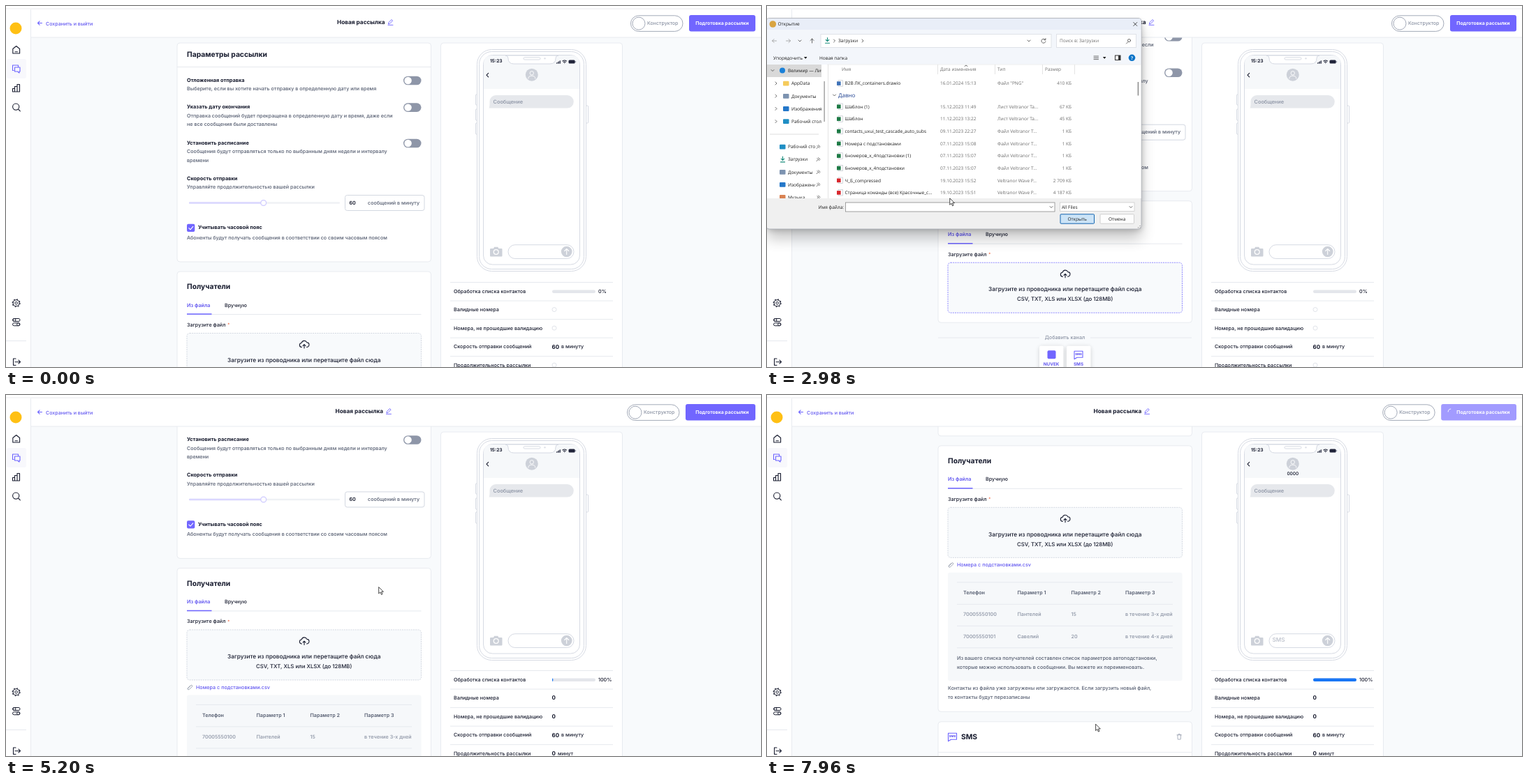
Animation, 1081 px wide and 518 px high, one loop 8000 ms. Source, as an HTML page:

```html
<!DOCTYPE html>
<html lang="ru">
<head>
<meta charset="utf-8">
<title>Новая рассылка</title>
<style>
html, body { margin: 0; width: 100%; height: 100%; overflow: hidden; background: #f8fafc; }
svg { display: block; width: 100%; height: 100%; }
text { font-family: Inter, sans-serif; font-size: 7.2px; font-weight: 500; fill: #171b2e; text-rendering: geometricPrecision; white-space: pre; }
.d { font-size: 7.17px; font-weight: 450; fill: #555d70; }
.b { font-size: 7.35px; font-weight: 700; }
.h { font-size: 10.3px; font-weight: 700; }
.z { font-size: 8.3px; }
.p { fill: #6257f0; }
.g { fill: #8a92a3; }
.n { font-weight: 700; font-size: 8px; }
.w { font-family: "Open Sans", "Noto Sans", sans-serif; font-size: 6.5px; font-weight: 400; fill: #1c1c1c; }
.k { fill: #6d6d6d; }
.i { fill: none; stroke: #171b2e; stroke-width: 1.1; stroke-linecap: round; stroke-linejoin: round; }
.v { stroke: #6c63ff; }
.l { fill: none; stroke: #d6dae3; stroke-width: 1; }
</style>
</head>
<body>
<svg id="stage" viewBox="0 0 1081 518" preserveAspectRatio="none"></svg>
<script>
const LOOP = 8000;
const VIOLET = '#7166ff';

// Text is placed by the middle of its capital height.
const text = (x, y, s, cls = '', more = '') => `<text x="${x}" y="${y}" dy=".36em" class="${cls}" ${more}>${s}</text>`;
const rect = (x, y, w, h, fill, more = '') => `<rect x="${x}" y="${y}" width="${w}" height="${h}" fill="${fill}" ${more}/>`;
const dot = (x, y, r, fill, more = '') => `<circle cx="${x}" cy="${y}" r="${r}" fill="${fill}" ${more}/>`;
const path = (d, cls = 'i', more = '') => `<path d="${d}" class="${cls}" ${more}/>`;
const hline = (x, y, x2, c = '#e6e9ee') => `<path d="M${x} ${y}H${x2}" stroke="${c}"/>`;
const group = (id, body, more = '') => `<g id="${id}" ${more}>${body}</g>`;
const shadow = (x, y, w, h, blur, alpha) => rect(x, y, w, h, '#000', `rx="4" opacity="${alpha}" style="filter:blur(${blur}px)"`);
const card = (y, h, id = '') => rect(245, y, 363.5, h, '#fff', `rx="4" stroke="#e8ebf0" ${id && `id="${id}"`}`);
const lines = (x, y, gap, cls, rows) => rows.map((s, i) => text(x, y + i * gap, s, cls)).join('');

const toggle = y => rect(569, y - 6.3, 25.5, 12.6, '#8e96a8', 'rx="6.3"') + dot(575.6, y, 5.2, '#fff');
const option = (y, name, rows) => text(259, y, name, 'b') + lines(259, y + 12.5, 12.6, 'd', rows);

const smsIcon = (x, y) => path(`M${x - 6} ${y - 5}h12v9h-8l-4 2.5z`, 'i v') +
  text(x, y - .5, 'SMS', 'p', 'text-anchor="middle" style="font-size:4.2px;font-weight:800"');

const settings = () => card(53, 314) +
  text(259, 69.5, 'Параметры рассылки', 'h') + hline(245, 87.5, 608) +
  option(106, 'Отложенная отправка', ['Выберите, если вы хотите начать отправку в определенную дату или время']) +
  option(144.5, 'Указать дату окончания', ['Отправка сообщений будет прекращена в определенную дату и время, даже если', 'не все сообщения были доставлены']) +
  option(196, 'Установить расписание', ['Сообщения будут отправляться только по выбранным дням недели и интервалу', 'времени']) +
  option(247, 'Скорость отправки', ['Управляйте продолжительностью вашей рассылки']) +
  [107, 145.6, 197].map(toggle).join('') +
  rect(262, 281.3, 216, 2.4, '#eff1f5', 'rx="1"') + rect(262, 281.3, 107, 2.4, '#dad7ff', 'rx="1"') +
  dot(368.7, 282.5, 3.9, '#fff', 'stroke="#cfcbff" stroke-width="1.3"') +
  rect(485.5, 271.5, 113.5, 22, '#fff', 'rx="3" stroke="#d3d8e1"') +
  text(491.5, 282, '60', '', 'style="font-weight:600"') + text(518, 282, 'сообщений в минуту', 'd') +
  rect(259, 312.8, 11.3, 11.3, VIOLET, 'rx="2"') + path('M261.8 318.6l2.2 2.2l3.8-4.4', 'i', 'style="stroke:#fff"') +
  text(275, 317.5, 'Учитывать часовой пояс', 'b') +
  text(259, 332.3, 'Абоненты будут получать сообщения в соответствии со своим часовым поясом', 'd');

const COLS = [281, 358.5, 435.5, 513];
const tableRow = (y, cells, cls, more) => cells.map((s, i) => text(COLS[i], y, s, cls, more)).join('');
const table = () => rect(259, 563, 335.5, 155.5, '#f6f8fa', 'rx="3"') +
  [577, 608.5, 639.5, 671].map(y => hline(272, y, 581)).join('') +
  tableRow(592, ['Телефон', 'Параметр 1', 'Параметр 2', 'Параметр 3'], 'd', 'style="font-weight:600"') +
  tableRow(623, ['70005550100', 'Пантелей', '15', 'в течение 3-х дней'], 'g') +
  tableRow(654.5, ['70005550101', 'Савелий', '20', 'в течение 4-х дней'], 'g') +
  lines(272, 686, 12.4, 'd', ['Из вашего списка получателей составлен список параметров автоподстановки,', 'которые можно использовать в сообщении. Вы можете их переименовать.']);

const tile = x => shadow(x, 590, 34.5, 36, 3, .16) + rect(x, 589, 34.5, 35, '#fff', 'rx="2"');
const recipients = () => card(381, 174.5, 'box') +
  text(259, 402.5, 'Получатели', 'h') +
  text(259, 429, 'Из файла', 'p', 'style="font-weight:600"') + text(313, 429, 'Вручную') +
  hline(259, 442.5, 594.5) + rect(259, 441.3, 35.5, 1.5, '#6c63ff') +
  text(259, 457.3, 'Загрузите файл') + text(317.3, 457, '*', '', 'style="fill:#f0643c;font-size:6px"') +
  rect(259, 469.5, 335.5, 72, '#f8fafc', 'id="zone" rx="4" stroke-dasharray="2 1.2"') +
  path('M423.5 489.5a3 3 0 0 1-.3-6a4 4 0 0 1 7.6-.6a3.2 3.2 0 0 1-.3 6.6M427 491v-5.4m-2 2l2-2l2 2') +
  text(426.7, 507.8, 'Загрузите из проводника или перетащите файл сюда', 'z', 'text-anchor="middle"') +
  text(426.7, 522, 'CSV, TXT, XLS или XLSX (до 128MB)', 'z', 'text-anchor="middle" style="font-size:7.8px"') +
  group('link', path('M260.5 553.5l4.2-4.2q1.4-1 2 .3q.4.8-.5 1.6l-3.8 3.8q-1.6 1.1-2.3-.4q-.3-1 .6-1.8l3.2-3.2', 'i', 'style="stroke:#8a92a3;stroke-width:.8"') + text(272, 551.5, 'Номера с подстановками.csv', 'p')) +
  group('table', table()) +
  group('note', lines(259, 729, 12.4, 'd', ['Контакты из файла уже загружены или загружаются. Если загрузить новый файл,', 'то контакты будут перезаписаны'])) +
  group('add', hline(245, 577.3, 390) + hline(463, 577.3, 608) +
    text(426.5, 576.8, 'Добавить канал', 'g', 'text-anchor="middle"') +
    tile(390) + tile(429) + rect(401.5, 595.5, 12, 12, VIOLET, 'rx="2"') + smsIcon(446, 601.5) +
    text(407, 615.3, 'NUVEK', 'p', 'text-anchor="middle" style="font-size:6.3px;font-weight:700"') +
    text(446, 615.3, 'SMS', 'p', 'text-anchor="middle" style="font-size:6.3px;font-weight:700"')) +
  group('sms', card(777, 120) + smsIcon(265.5, 798.5) + text(278, 798, 'SMS', 'h') + hline(245, 821, 608) +
    path('M587 796h6.4M589 796v-1.2h2.4v1.2M587.8 796l.4 6.3h4l.4-6.3', 'i', 'style="stroke:#a3aab8;stroke-width:.9"'));

const frame = (x, y, w, h, r, fill = '#fff') => rect(x, y, w, h, fill, `rx="${r}" stroke="#d6dae3"`);
const phone = () => [[672, 127, 15], [672, 148, 16], [672, 168, 16], [830, 143, 25]].map(([x, y, h]) => frame(x + .5, y, 3, h, 1)).join('') +
  frame(674.5, 62.5, 156, 318, 21) + frame(677.5, 65.5, 150, 312, 18) + frame(683.5, 70.5, 138, 300.5, 13) +
  rect(684, 84, 137, 35, '#f6f8fa') + path('M684 84V83q0-12 12-12H809q12 0 12 12V84z', '', 'fill="#f6f8fa"') +
  path('M715 71q4 0 4 4q0 8 8 8h52q8 0 8-8q0-4 4-4z', '', 'fill="#fff" stroke="#d6dae3"') +
  frame(741, 73.8, 24, 3.2, 1.6) + dot(771.5, 75.3, 1.3, '#e1e4ea') +
  text(693, 79, '15:23', '', 'style="font-size:6.6px;font-weight:700"') +
  [0, 1, 2, 3].map(i => rect(788 + i * 1.6, 81.3 - i, 1.1, 1.4 + i, '#20243a')).join('') +
  path('M797 79q2.7-2 5.4 0M798.3 80.6q1.4-1 2.8 0M799.7 82h.1') + rect(805.5, 77.6, 9.2, 5, '#20243a', 'rx="1.5"') + rect(815.2, 79.2, 1, 1.8, '#8a92a3') +
  path('M690.7 96.4l-2.7 2.7l2.7 2.7') +
  dot(752.8, 98.7, 9, '#cdd1d9') + dot(752.8, 96.3, 2.7, 'none', 'stroke="#fff" stroke-width=".9"') + path('M747.8 104q0-3.8 5-3.8t5 3.8', 'i', 'style="stroke:#fff;stroke-width:.9"') +
  path('M701.5 128h102a9.3 9.3 0 0 1 0 18.6h-112q1.2-2 1-9.3a9 9 0 0 1 9-9.3z', '', 'fill="#e6e8ec"') +
  text(697.5, 137, 'Сообщение', 'g', 'style="font-size:7.4px"') +
  path('M694 348h3.8l1.4-2.2h5l1.4 2.2h3.9q1 0 1 1v9.5q0 1-1 1h-15.5q-1 0-1-1v-9.5q0-1 1-1z', '', 'fill="#cdd1d9"') + dot(701.7, 353, 3.4, 'none', 'stroke="#fff" stroke-width="1.3"') +
  frame(719, 342.7, 94, 19.8, 9.9) + dot(802.7, 352.5, 7.8, '#cdd1d9') + path('M802.7 356.5v-8m-3 3l3-3l3 3', 'i', 'style="stroke:#fff"') +
  group('sender', text(752.8, 112.6, '0000', '', 'text-anchor="middle" style="font-size:6.5px"') + text(723.5, 351.5, 'SMS', '', 'style="font-size:8.2px;fill:#b9bec9"'));

const NAMES = ['Обработка списка контактов', 'Валидные номера', 'Номера, не прошедшие валидацию', 'Скорость отправки сообщений', 'Продолжительность рассылки'];
const rowY = i => 409 + i * 26.55;
const stats = () => NAMES.map((s, i) => hline(636, rowY(i) - 12.5, 869) + text(641, rowY(i), s)).join('') +
  rect(782, 407.6, 62, 4.4, '#e4e6eb', 'rx="2.2"') + rect(782, 407.6, 0, 4.4, '#1976f5', 'id="bar" rx="2.2"') +
  text(781.5, rowY(3), '60', 'n') + text(795, rowY(3), 'в минуту') +
  group('wait', text(848, 409, '0%') + [1, 2, 4].map(i => dot(785, rowY(i), 3, 'none', 'stroke="#e1e4ea"')).join('')) +
  group('done', text(848, 409, '100%') + [1, 2, 4].map(i => text(781.5, rowY(i), '0', 'n')).join('') + text(790, rowY(4), 'минут'));

const header = () => rect(0, 0, 1081, 45, '#fff') + hline(0, 4, 1081, '#e8e9ec') + hline(35, 45, 1081, '#e8ebf0') +
  path('M51.5 24.5h-6m2.6-2.6l-2.6 2.6l2.6 2.6', 'i v') + text(57, 25, 'Сохранить и выйти', 'p', 'style="font-size:7.1px"') +
  group('name', text(474, 23.2, 'Новая рассылка', '', 'style="font-size:8.28px;font-weight:650"') +
    path('M547.5 25.5l.5-2l4-4l1.6 1.6l-4 4zM547 27.3h7', 'i v', 'style="stroke-width:.9"')) +
  group('mode', rect(894.5, 13.8, 74.5, 22.6, '#fff', 'rx="11.3" stroke="#a3aab8"') + dot(906, 25.1, 9, '#fff', 'stroke="#a3aab8"') +
    text(918, 24.4, 'Конструктор', 'g', 'style="font-size:7.03px"')) +
  rect(978, 13, 95, 23.5, VIOLET, 'id="btn" rx="3"') +
  text(987.3, 24.4, 'Подготовка рассылки', '', 'style="fill:#fff;font-size:6.85px;font-weight:650"') +
  group('spin', path('M2.7-2.7A3.8 3.8 0 0 1 2.7 2.7', 'i', 'style="stroke:#fff;stroke-width:.9"'));

const sidebar = () => rect(0, 4.5, 35, 514, '#fff') + path('M35.5 5V518', 'l', 'style="stroke:#e8ebf0"') +
  dot(14, 32, 8.5, '#ffc014') + rect(1, 76, 28, 28, '#f8f8fc', 'rx="3"') +
  path('M9.8 61.5l4.9-4l4.9 4v6.5h-9.8zM13 65.7h3.4') +
  path('M11 92.5h-1.5v-7.5h8v2.5M12.5 88h7.5v6h-1v2l-2.5-2h-4z', 'i v') +
  path('M9.5 118.5h3v4.5h-3zM12.5 115.5h3.5v7.5h-3.5zM16 112.5h3.5v10.5h-3.5z') +
  path('M18 148.5l2.3 2.3') + dot(14.2, 144.6, 4.6, 'none', 'stroke="#171b2e" stroke-width="1.1"') +
  dot(14.6, 426.3, 4.5, 'none', 'stroke="#171b2e" stroke-width="1.1"') + dot(14.6, 426.3, 1.8, 'none', 'stroke="#171b2e"') +
  dot(14.6, 426.3, 5.5, 'none', 'stroke="#171b2e" stroke-width="1.1" stroke-dasharray="1.8 2.52"') +
  [450.5, 456.8].map((y, i) => rect(9.5, y - 2, 10.5, 4, 'none', 'rx="2" stroke="#171b2e"') + dot(i ? 17.5 : 12, y, 1.9, '#fff', 'stroke="#171b2e"')).join('') +
  hline(0, 480.5, 29) + path('M14 506h-3.5v9.5h3.5M13 510.7h7.5m-2.5-2.5l2.5 2.5l-2.5 2.5');

const thin = (d, c = '#444') => path(d, 'i', `style="stroke:${c};stroke-width:.8"`);
const chevron = (x, y, down) => thin(down ? `M${x - 2} ${y - 1}l2 2l2-2` : `M${x - 1} ${y - 2}l2 2l-2 2`);
const BLUE = '#3f72b8', GREEN = '#1d7a45', RED = '#d8262c';
const FILES = [
  [111, BLUE, 'B2B ЛК_containers.drawio', '16.01.2024 15:13', 'Файл "PNG"', '410 КБ'],
  [144.2, GREEN, 'Шаблон (1)', '15.12.2023 11:49', 'Лист Veltranor Ta...', '67 КБ'],
  [162, GREEN, 'Шаблон', '11.12.2023 13:22', 'Лист Veltranor Ta...', '45 КБ'],
  [179.6, GREEN, 'contacts_uxui_test_cascade_auto_subs', '09.11.2023 22:27', 'Файл Veltranor T...', '1 КБ'],
  [197.3, GREEN, 'Номера с подстановками', '07.11.2023 15:08', 'Файл Veltranor T...', '1 КБ'],
  [215, GREEN, '6номеров_х_4подстановки (1)', '07.11.2023 15:07', 'Файл Veltranor T...', '1 КБ'],
  [232.5, GREEN, '6номеров_х_4подстановки', '07.11.2023 15:07', 'Файл Veltranor T...', '1 КБ'],
  [250.2, RED, 'Ч_Б_compressed', '19.10.2023 15:52', 'Veltranor Wave P...', '2 709 КБ'],
  [267.8, RED, 'Страница команды (все) Красочные_с...', '19.10.2023 15:51', 'Veltranor Wave P...', '4 187 КБ']];
const fileRow = ([y, c, name, date, kind, size]) => rect(102, y - 4.2, 6.6, 8.4, '#fff', 'stroke="#b4bac2" stroke-width=".6"') +
  rect(100, y - 2.7, 5.6, 5.6, c) + text(111.5, y, name, 'w') +
  text(248, y, date, 'w k') + text(330, y, kind, 'w k') + text(436, y, size, 'w k', 'text-anchor="end"');
const place = (x, y, c, name) => rect(x, y - 3.3, 8.5, 6.8, c, 'rx="1"') + text(x + 12, y, name, 'w');
const downMark = (x, y) => path(`M${x} ${y - 4}v5m-2.2-2l2.2 2.2l2.2-2.2M${x - 3} ${y + 3.8}h6`, 'i', 'style="stroke:#168a7a"');

const navigation = () => rect(0, 84, 78, 18, '#d9d9d9') + chevron(8, 92.5, 1) + dot(22, 92.5, 4, '#1a80d8') + text(30, 92.5, 'Велимир — Личное', 'w') +
  [['AppData', '#f5cb5c'], ['Документы', '#7d93b0'], ['Изображения', '#2477c9'], ['Рабочий стол', '#1f8ec4']].map(([s, c], i) =>
    chevron(13, 111 + i * 18.2) + place(23, 111 + i * 18.2, c, s)).join('') +
  hline(4, 184, 74, '#ddd') +
  [['Рабочий сто', '#1f8ec4'], ['Загрузки'], ['Документы', '#7d93b0'], ['Изображени', '#2477c9'], ['Музыка', '#d98252']].map(([s, c], i) => {
    const y = 202 + i * 18.1;
    return (c ? place(18, y, c, s) : downMark(22.5, y) + text(30, y, s, 'w')) + rect(69, y - 3, 9, 7, '#fff') + thin(`M71 ${y + 2.5}l2-2m-1-2l3 3m-1.5-4l2.5 2.5`);
  }).join('');

const dialog = () => shadow(0, 34, 536, 300, 10, .22) + shadow(0, 22, 536, 299, 4, .22) +
  rect(-1, 17.5, 537, 302.5, '#f0f0f0', 'rx="4" stroke="#a9adb5" stroke-width=".8"') +
  rect(0, 18, 535.5, 18, '#e9eef8', 'rx="3"') + rect(0, 34, 535.5, 50, '#f3f6fb') + rect(0, 84, 535.5, 192, '#fff') +
  dot(8.3, 26, 4.8, '#d9a441') + text(15.5, 26, 'Открытие', 'w') + thin('M524.8 23.5l5 5m0-5l-5 5', '#222') +
  thin('M13.5 50h-6m2.5-2.5l-2.5 2.5l2.5 2.5M27.5 50h6m-2.5-2.5l2.5 2.5l-2.5 2.5', '#999') +
  thin('M64.5 53v-6m-2.5 2.5l2.5-2.5l2.5 2.5') + chevron(47, 50, 1) +
  rect(77, 40.5, 330, 19, '#fff', 'stroke="#dfe2e8"') + rect(414.5, 40.5, 114, 19, '#fff', 'stroke="#dfe2e8"') +
  downMark(86.5, 49.5) + chevron(96.5, 50) + text(102, 50, 'Загрузки', 'w') + chevron(137, 50) + chevron(375, 50, 1) +
  thin('M398.5 48.5a3 3 0 1 0 .4 2.5M398.9 46.5v2.2h-2.2') + text(419, 50, 'Поиск в: Загрузки', 'w k') +
  thin('M517 51.5l-2.5 2.5M520.5 49.5a2 2 0 1 1-4 0a2 2 0 1 1 4 0') +
  text(9, 74.3, 'Упорядочить', 'w') + text(75, 74.3, 'Новая папка', 'w') + path('M53 73l2.2 2.7l2.2-2.7zM481 73l2.2 2.7l2.2-2.7z', '') +
  thin('M468 72h6.5m-6.5 2.3h6.5m-6.5 2.3h6.5') + rect(498.5, 71, 7.5, 6.5, '#fff', 'stroke="#333"') + rect(503, 71, 3, 6.5, '#333') +
  dot(522.5, 74.3, 4.8, '#0b74c8') + text(522.5, 74.3, '?', 'w', 'text-anchor="middle" style="fill:#fff;font-weight:700"') +
  `<g clip-path="url(#nav)">${navigation()}</g>` + rect(81.5, 108, 1.2, 58, '#8d8d8d') + hline(86, 84, 535, '#eee') +
  path('M87.5 84V276M244.5 84V98M326.5 84V98M394.5 84V98M440.5 84V98', 'l', 'style="stroke:#e4e4e4"') +
  [[107, 'Имя'], [248, 'Дата изменения'], [330, 'Тип'], [398, 'Размер']].map(([x, s]) => text(x, 91, s, 'w k')).join('') + thin('M283 86.5l2-1.5l2 1.5') +
  chevron(96.5, 128, 1) + text(102, 128, 'Давно', 'w', 'style="font-size:8px;fill:#1c3f8f"') +
  rect(98, 189.2, 340, 15.8, '#d9d9d9', 'id="pick"') + FILES.map(fileRow).join('') + rect(530.7, 109, 1.4, 19.5, '#858585') +
  text(110, 288.5, 'Имя файла:', 'w', 'text-anchor="end"') +
  rect(112.5, 282, 299.5, 13, '#fff', 'stroke="#8a8a8a" stroke-width=".8"') + rect(419.5, 282, 106.5, 12.5, '#fff', 'stroke="#ccc" stroke-width=".8"') +
  text(115, 288.5, 'Номера с подстановками', 'w', 'id="file"') + text(422, 288.5, 'All Files', 'w') + chevron(407, 288.5, 1) + chevron(521, 288.5, 1) +
  rect(420, 298.8, 48.5, 13.4, '#cce4f7', 'rx="1" stroke="#1565b0"') + rect(477, 298.8, 48.5, 13.4, '#fdfdfd', 'rx="1" stroke="#d0d0d0"') +
  text(444.2, 305.7, 'Открыть', 'w', 'text-anchor="middle"') + text(501.2, 305.7, 'Отмена', 'w', 'text-anchor="middle"') +
  thin('M534 315.5h.1M534 318h.1M531.5 318h.1');

const el = id => document.getElementById(id);
el('stage').innerHTML = '<defs><clipPath id="nav"><rect x="0" y="84" width="78" height="192"/></clipPath></defs>' +
  rect(0, 0, 1081, 518, '#f8fafc') + group('page', settings() + recipients()) +
  rect(622.5, 53, 260, 480, '#fff', 'rx="4" stroke="#e8ebf0"') + phone() + group('stats', stats()) +
  header() + sidebar() + group('dialog', dialog()) +
  group('cursor', dot(.8, 2, 8, '#f5e50f', 'id="press" opacity=".7"') +
    '<path d="M0 0V9.4L2.2 7.4L3.8 10.9L5.3 10.2L3.8 6.8H6.7Z" fill="#fff" stroke="#1a1a1a" stroke-width=".8" stroke-linejoin="round"/>');

const set = (id, attrs) => { for (const k in attrs) el(id).setAttribute(k, attrs[k]); };
const move = (id, x, y) => set(id, { transform: `translate(${x} ${y})` });
const show = (id, on) => set(id, { display: on ? 'inline' : 'none' });
const clamp = x => Math.min(1, Math.max(0, x));
const smooth = x => x * x * (3 - 2 * x);
const ramp = (t, a, b) => smooth(clamp((t - a) / (b - a)));
const within = (t, a, b) => t >= a && t < b;

// Track rows are [time, ...values].
function follow(track, t, ease = smooth) {
  const i = track.findIndex(k => k[0] > t);
  if (i === 0) return track[0].slice(1);
  if (i < 0) return track[track.length - 1].slice(1);
  const a = track[i - 1], b = track[i];
  const u = ease((t - a[0]) / (b[0] - a[0]));
  return a.slice(1).map((v, j) => v + (b[j + 1] - v) * u);
}

const POINTER = [[130, 1012, 520], [620, 502, 151], [710, 498.5, 157.5], [1350, 498.5, 157.5], [1810, 414, 413],
  [2300, 413.3, 416.3], [2690, 413.3, 416.3], [3150, 195, 214], [3420, 165, 197], [3650, 165, 197], [3920, 446, 304],
  [4180, 446, 304], [4640, 533.7, 275.5], [5200, 533.7, 275.5], [5480, 525.6, 279], [5800, 524, 285],
  [6560, 443, 502], [6750, 443, 502], [7250, 441, 506], [7560, 441, 506], [7930, 470.6, 472.2]];
const SCROLL = [[1010, 0], [1070, 9], [1180, 61.3], [1280, 94], [1350, 101.3],
  [5130, 101.3], [5200, 131.6], [5300, 228], [5400, 295], [5470, 308.2]];
const CLICKS = [[2420, 2540], [3590, 3700], [3940, 4110], [7430, 7550]];

function draw(t) {
  move('page', 0, -follow(SCROLL, t, x => x)[0]);
  move('cursor', ...follow(POINTER, t));
  show('press', CLICKS.some(([a, b]) => within(t, a, b)));

  const step = t < 4340 ? 0 : t < 5020 ? 1 : 2;
  const sms = t >= 7560;
  const grow = [0, 46, 207][step];
  set('box', { height: 174.5 + grow });
  set('zone', { stroke: within(t, 1700, 4240) ? '#8f88ff' : '#d3d8e1' });
  show('link', step > 0);
  show('table', step > 1);
  show('note', step > 0);
  move('note', 0, grow - 207);
  move('add', 0, grow);
  show('add', !sms);
  show('sms', sms);
  show('sender', sms);

  const done = t >= 5080;
  show('wait', !done);
  show('done', done);
  move('stats', 0, done ? -1 : 0);
  set('bar', { width: 62 * ramp(t, 5175, 5475) });

  const wide = 12.8 * ramp(t, 5090, 5350);
  move('name', -wide / 2, 0);
  move('mode', -wide, 0);
  set('btn', { x: 978 - wide, width: 95 + wide, opacity: 1 - .35 * ramp(t, 5200, 5460) });
  set('spin', { opacity: ramp(t, 5210, 5400), transform: `translate(979 23.8) rotate(${(t - 5510) * .36 + 60})` });

  const open = ramp(t, 2550, 2690) * (1 - ramp(t, 4140, 4250));
  const size = .94 + .06 * open;
  show('dialog', open > 0);
  set('dialog', { opacity: open, transform: `translate(268 168) scale(${size}) translate(-268 -168)` });
  show('pick', t >= 3620);
  show('file', t >= 3620);
}

const start = performance.now();
function tick() {
  draw((performance.now() - start) % LOOP);
  requestAnimationFrame(tick);
}
tick();
</script>
</body>
</html>
```
